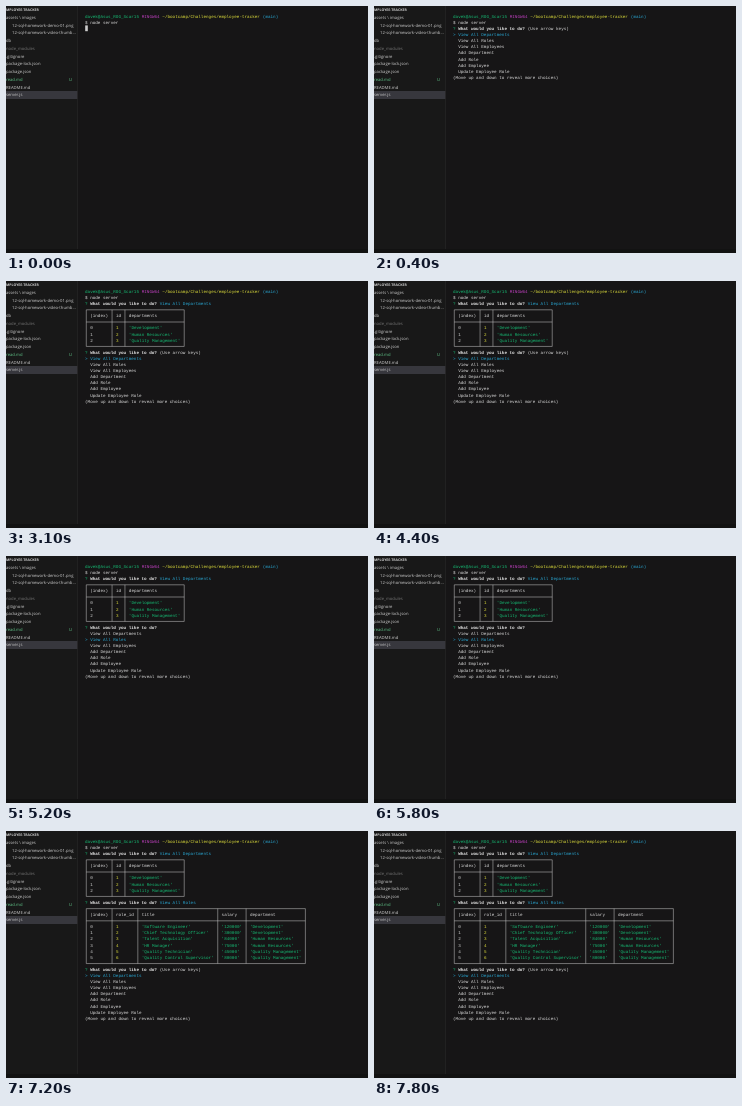
These frames come from a looping animation (362x247 px, 8000 ms). An HTML page:

```html
<!DOCTYPE html>
<html lang="en">
<head>
<meta charset="utf-8">
<title>Employee tracker terminal</title>
<style>
  html, body { margin: 0; width: 100%; height: 100%; overflow: hidden; background: #161516; }
  svg { display: block; width: 100vw; height: 100vh; }
  text { white-space: pre; text-rendering: geometricPrecision; }
  #side text { font: 4.2px "Open Sans", "Noto Sans", sans-serif; fill: #cccccc; }
  #side .title { font-size: 3.5px; font-weight: 700; }
  #side .dim { fill: #737373; }
  #side .new { fill: #60c488; }
  #term text { font: 4.295px "Liberation Mono", monospace; fill: #dcdcdc; }
  #term .green { fill: #16bd75; }
  #term .magenta { fill: #bc3fbc; }
  #term .yellow { fill: #e0e03c; }
  #term .cyan { fill: #29a8d4; }
  #term .bold { font-weight: 700; fill: #e8e8e8; }
  #term path { fill: none; stroke: #cccccc; stroke-width: .5; }
</style>
</head>
<body>
<svg viewBox="0 0 362 247" preserveAspectRatio="none">
  <rect width="362" height="247" fill="#161516"/>
  <rect width="71" height="247" fill="#181818"/>
  <rect y="85" width="71.5" height="8" fill="#37373d"/>
  <rect x="71" width=".6" height="247" fill="#2a2a2a"/>
  <rect y="243" width="362" height="4" fill="#121212"/>
  <g id="side"></g>
  <g id="term"></g>
</svg>
<script>
const LOOP = 8000;
const LEFT = 79, TOP = 10.5, CELL = 2.5775, LINE = 6.103;
const side = document.getElementById('side');
const term = document.getElementById('term');

const colX = col => LEFT + col * CELL;
const rowY = row => TOP + row * LINE;

const files = [
  ['MPLOYEE-TRACKER', 'title'],
  ['assets \\ images'],
  ['12-sql-homework-demo-01.png', '', 6],
  ['12-sql-homework-video-thumb...', '', 6],
  ['db'],
  ['node_modules', 'dim'],
  ['.gitignore'],
  ['package-lock.json'],
  ['package.json'],
  ['read.md', 'new'],
  ['README.md'],
  ['server.js']
];
const label = (s, cls, x, y) => `<text class="${cls}" x="${x}" y="${y}">${s}</text>`;
side.innerHTML = files.map(([s, cls = '', x = 0], i) =>
  label(s, cls, x, 5.1 + i * 7.76)).join('') + label('U', 'new', 63, 5.1 + 9 * 7.76);

const put = (s, row, col = 0, cls = '') =>
  label(s.replace(/>/g, '&gt;'), cls, colX(col), rowY(row) + 1.3);

// Runs of [text, class] set one after another on a row
function runs(row, ...parts) {
  let col = 0, out = '';
  for (const [s, cls] of parts) {
    out += put(s, row, col, cls);
    col += s.length;
  }
  return out;
}

const choices = ['View All Departments', 'View All Roles', 'View All Employees',
  'Add Department', 'Add Role', 'Add Employee', 'Update Employee Role'];

const ask = (row, tail, cls) => runs(row, ['? ', 'green'],
  ['What would you like to do? ', 'bold'], [tail, cls]);

function menu(row, pick, hint) {
  return ask(row, hint ? '(Use arrow keys)' : '', '') +
    choices.map((c, i) => i === pick
      ? put('> ' + c, row + 1 + i, 0, 'cyan')
      : put(c, row + 1 + i, 2)).join('') +
    put('(Move up and down to reveal more choices)', row + 8);
}

function table(row, head, data) {
  const rows = data.map((r, i) => [i, ...r]);
  const show = v => typeof v === 'string' ? `'${v}'` : String(v);
  const bars = [0];
  head.forEach((h, i) => {
    const wide = Math.max(h.length, ...rows.map(r => show(r[i]).length));
    bars.push(bars[i] + wide + 3);
  });
  const mid = col => colX(col + .5);
  const end = row + rows.length + 3;
  const across = y => `M${mid(0)} ${rowY(y)}H${mid(bars[head.length])}`;
  const lines = [row, row + 2, end].map(across).join('') +
    bars.map(b => `M${mid(b)} ${rowY(row)}V${rowY(end)}`).join('');
  const cells = rows.map((r, j) => r.map((v, i) =>
    put(show(v), row + 3 + j, bars[i] + 2,
      i === 0 ? '' : typeof v === 'string' ? 'green' : 'yellow')).join('')).join('');
  return `<path d="${lines}"/>` +
    head.map((h, i) => put(h, row + 1, bars[i] + 2)).join('') + cells;
}

const [dev, hr, qm] = ['Development', 'Human Resources', 'Quality Management'];

const prompt = runs(0, ['davek@Asus_ROG_Scar15 ', 'green'], ['MINGW64 ', 'magenta'],
  ['~/bootcamp/Challenges/employee-tracker ', 'yellow'], ['(main)', 'cyan']) +
  put('$ node server', 1);

const departments = prompt + ask(2, choices[0], 'cyan') +
  table(3, ['(index)', 'id', 'departments'], [[1, dev], [2, hr], [3, qm]]);

const roles = departments + ask(10, choices[1], 'cyan') +
  table(11, ['(index)', 'role_id', 'title', 'salary', 'department'], [
    [1, 'Software Engineer', '120000', dev],
    [2, 'Chief Technology Officer', '300000', dev],
    [3, 'Talent Acquisition', '84000', hr],
    [4, 'HR Manager', '75000', hr],
    [5, 'Quality Technician', '45000', qm],
    [6, 'Quality Control Supervisor', '80000', qm]
  ]);

const cursor = `<rect x="79.2" y="19.4" width="2.6" height="5.8" fill="#cccccc"/>`;

// [start in ms, screen]
const screens = [
  [0, prompt + cursor],
  [400, prompt + menu(2, 0, true)],
  [3100, departments + menu(10, 0, true)],
  [4900, departments + menu(10, 1, false)],
  [6700, roles + menu(21, 0, true)]
];

let shown = -1;
function draw(ms) {
  const t = ms % LOOP;
  const now = screens.filter(([start]) => t >= start).length - 1;
  if (now !== shown) {
    term.innerHTML = screens[now][1];
    shown = now;
  }
}

const begin = performance.now();
function tick() {
  draw(performance.now() - begin);
  requestAnimationFrame(tick);
}
tick();
</script>
</body>
</html>
```
